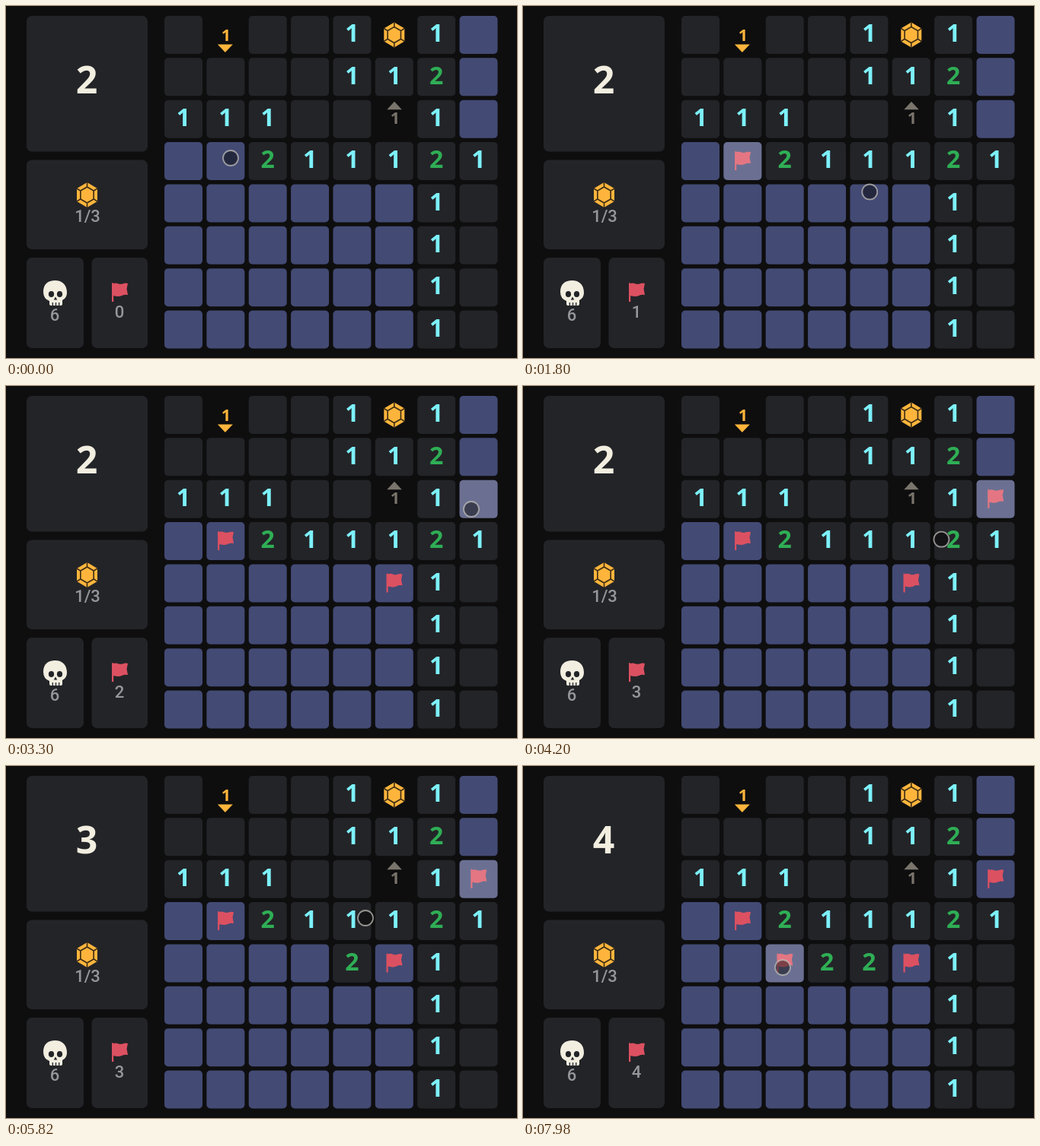
Write an HTML page that moves like this. It is 671 by 463 pixels and loops after 8 s.

```html
<!DOCTYPE html>
<html lang="en">
<head>
<meta charset="utf-8">
<title>Minefield</title>
<style>
html, body { margin: 0; width: 100%; height: 100%; overflow: hidden; background: #0e0e0f; }
svg { display: block; width: 671px; height: 463px; }
text { text-anchor: middle; font: 700 32px "Noto Sans", sans-serif; }
.score { font-size: 50px; fill: #f2eee0; }
.label { font: 500 22px Roboto, sans-serif; fill: #97979a; }
.hint { font-size: 21.5px; }
</style>
</head>
<body>
<svg id="stage" viewBox="0 0 671 463"></svg>
<script>
const LOOP = 8000, STEP = 55.36, SIZE = 50;
const PANEL = '#232428', HIDDEN = '#434a74', DARK = '#0e0e0f', GOLD = '#ffb53c', GREY = '#7a756c';
const DIGIT = { 1: '#7df1fa', 2: '#2fae55' };

// '#' hidden, '.' empty, 'g' gem, 'v' and '^' hints
const BOARD = ['.v..1g1#', '....112#', '111..^1#', '##211121',
  '######1.', '######1.', '######1.', '######1.'];

// [time, column, row]
const FLAGS = [[540, 1, 3], [2580, 5, 4], [3840, 7, 2], [7860, 2, 4]];
const REVEALS = [[4560, 4, 4], [6780, 3, 4]];
const FOCUS = [[540, 1, 3], [2280, 5, 4], [3300, 7, 2], [7320, 2, 4]];

// [time, x, y]
const POINTER = [[0, 295, 200], [60, 295, 200], [240, 294, 199], [600, 294, 199],
  [1080, 358, 207], [1200, 372, 212], [1440, 372, 212], [2040, 500, 262],
  [2280, 500, 262], [2460, 501, 269], [2640, 501, 269], [3300, 611, 162],
  [4020, 611, 162], [4440, 456, 262], [4620, 456, 264], [4860, 499, 313],
  [5280, 446, 262], [5820, 472, 200], [6480, 403, 255], [6840, 400, 262],
  [7320, 326, 278], [7560, 341, 265], [LOOP, 341, 265]];

const cellX = c => 208 + c * STEP;
const cellY = r => 13 + r * STEP;
const rect = (x, y, w, h, r, fill) =>
  `<rect x="${x}" y="${y}" width="${w}" height="${h}" rx="${r}" fill="${fill}"/>`;
const path = (d, fill, extra = '') => `<path d="${d}" fill="${fill}" ${extra}/>`;
const at = (x, y, body) => `<g transform="translate(${x} ${y})">${body}</g>`;
const text = (x, y, value, attrs) => `<text x="${x}" y="${y}" ${attrs}>${value}</text>`;
const tile = (c, r, fill) => rect(cellX(c), cellY(r), SIZE, SIZE, 5, fill);
const digit = (c, r, n) => text(cellX(c) + 25, cellY(r) + 34.3, n, `fill="${DIGIT[n]}"`);

const flag = path('M0 1Q0 0 1 0T2 1C7-1 9 3 14 1.5Q18 0 21 1L19.5 8 21 16Q17 15 13 17T2.2 17V25H0Z', '#dc5161');

function hexagon(k) {
  const points = [[0, -16.5], [13.5, -8.5], [13.5, 8.5], [0, 16.5], [-13.5, 8.5], [-13.5, -8.5]];
  return points.map(([x, y]) => [x * k, y * k]);
}
function makeGem() {
  const outer = hexagon(1), inner = hexagon(.64);
  const spokes = outer.map((p, i) => `M${p}L${inner[i]}`).join('');
  return path(`M${outer.join('L')}Z`, GOLD) +
    path(`M${inner.join('L')}Z${spokes}`, 'none', 'stroke="#3a2b14" stroke-width="1.6"');
}
const gem = makeGem();

const skull =
  path('M49 376C49 366 55 361 64.5 361S80 367 80 377Q80 384 74 387V392Q74 394 72 394H59Q57 394 57 392V388Q49 385 49 376Z', '#f2eee0') +
  path('M65 382.5L67.3 386.5H62.7Z', PANEL) +
  `<g fill="${PANEL}"><ellipse cx="59.5" cy="379" rx="3.6" ry="4"/><ellipse cx="70.5" cy="379" rx="3.6" ry="4"/></g>` +
  path('M61.3 390V394M65.5 390V394M69.7 390V394', 'none', `stroke="${PANEL}" stroke-width="1.3"`);

function cell(kind, c, r) {
  const x = cellX(c), y = cellY(r);
  if (kind === 'g') return at(x + 25, y + 25, gem);
  if (kind === 'v') return at(x, y,
    text(25.5, 33, 1, `class="hint" fill="${GOLD}"`) + path('M14.5 37.5H34.5L24.5 48Z', GOLD));
  if (kind === '^') return at(x, y,
    text(26, 31.5, 1, `class="hint" fill="${GREY}"`) + path('M15.5 12.5H35L25.2 2Z', GREY));
  if (kind === '#') return tile(c, r, HIDDEN);
  return tile(c, r, PANEL) + (kind === '.' ? '' : digit(c, r, kind));
}

const backdrop = rect(0, 0, 671, 463, 0, DARK) +
  rect(27, 13, 159, 178.5, 7, PANEL) + rect(27, 202.5, 159, 117.5, 7, PANEL) +
  rect(27, 331, 75, 119, 7, PANEL) + rect(112.5, 331, 73.5, 119, 7, PANEL) +
  at(106.5, 248.5, gem) + text(107, 284, '1/3', 'class="label"') +
  skull + text(64, 413.5, 6, 'class="label"') + at(139, 364, flag) +
  BOARD.map((row, r) => [...row].map((kind, c) => cell(kind, c, r)).join('')).join('');

function pointerAt(t) {
  const i = POINTER.findIndex(p => p[0] > t);
  const [t0, x0, y0] = POINTER[i - 1], [t1, x1, y1] = POINTER[i];
  const u = (t - t0) / (t1 - t0), e = u * u * (3 - 2 * u);
  return [x0 + (x1 - x0) * e, y0 + (y1 - y0) * e];
}

function scene(t) {
  const past = list => list.filter(([time]) => t >= time);
  const flags = past(FLAGS), reveals = past(REVEALS), focus = past(FOCUS).pop();
  const [x, y] = pointerAt(t);
  return backdrop +
    text(106, 115, 2 + reveals.length, 'class="score"') +
    text(149, 409.5, flags.length, 'class="label"') +
    reveals.map(([, c, r]) => tile(c, r, DARK) + tile(c, r, PANEL) + digit(c, r, 2)).join('') +
    flags.map(([, c, r]) => at(cellX(c) + 14.7, cellY(r) + 12, flag)).join('') +
    (focus ? tile(focus[1], focus[2], 'rgba(255,255,255,.21)') : '') +
    `<circle cx="${x}" cy="${y}" r="10" fill="rgba(0,0,0,.45)" stroke="rgba(190,188,182,.75)" stroke-width="1.8"/>`;
}

const stage = document.getElementById('stage');
function frame() {
  stage.innerHTML = scene(performance.now() % LOOP);
  requestAnimationFrame(frame);
}
frame();
</script>
</body>
</html>
```
